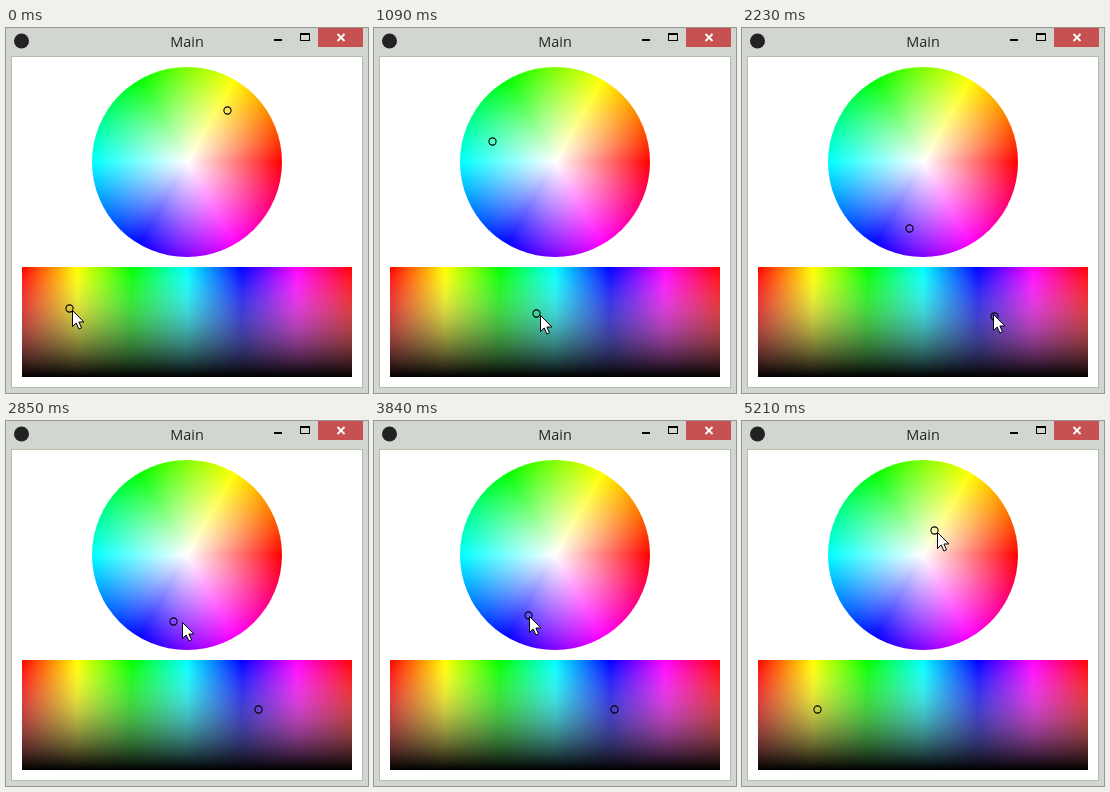
Animation of 362x365 px, one loop 5.44 s. Source, as an HTML page:

```html
<!DOCTYPE html>
<html lang="en">
<head>
<meta charset="utf-8">
<title>Main</title>
<style>
html, body { margin: 0; width: 100%; height: 100%; overflow: hidden; background: #d2d6d0; }
.client, .wheel, svg { position: absolute; box-sizing: border-box; }
.client { left: 5px; top: 28px; width: 352px; height: 332px; background: #fff; border: 1px solid #b3bdab; }
.wheel {
  left: 86px; top: 39px; width: 190px; height: 190px; border-radius: 50%;
  background:
    radial-gradient(circle closest-side, #fff, rgba(255, 255, 255, 0)),
    conic-gradient(from 90deg, #f00, #f0f, #00f, #0ff, #0f0, #ff0, #f00);
}
svg { left: 0; top: 0; }
text { font: 14.4px "Open Sans", "Noto Sans", sans-serif; fill: #262626; }
.ring { fill: none; stroke: #000; stroke-width: 1.1; }
</style>
</head>
<body>
<div class="client"></div>
<div class="wheel"></div>
<svg width="362" height="365" viewBox="0 0 362 365">
  <defs>
    <linearGradient id="hues">
      <stop offset="0" stop-color="#f00"/>
      <stop offset=".16667" stop-color="#ff0"/>
      <stop offset=".33333" stop-color="#0f0"/>
      <stop offset=".5" stop-color="#0ff"/>
      <stop offset=".66667" stop-color="#00f"/>
      <stop offset=".83333" stop-color="#f0f"/>
      <stop offset="1" stop-color="#f00"/>
    </linearGradient>
    <linearGradient id="shade" x2="0" y2="1">
      <stop offset="0" stop-color="#fff" stop-opacity="0"/>
      <stop offset="1" stop-color="#000"/>
    </linearGradient>
  </defs>

  <circle cx="15.5" cy="13" r="7.5" fill="#222"/>
  <text x="181" y="19" text-anchor="middle">Main</text>
  <path d="M268 11h8v2h-8z"/>
  <path d="M294 5h10v8h-10zM295 7v5h8v-5z" fill-rule="evenodd"/>
  <path d="M312 0h45v19h-45z" fill="#c75050"/>
  <path d="M331.5 6l7 7m0-7l-7 7" stroke="#fff" stroke-width="1.8"/>

  <path d="M16 239h330v110h-330z" fill="url(#hues)"/>
  <path d="M16 239h330v110h-330z" fill="url(#shade)"/>

  <circle id="wheelRing" class="ring" r="3.6"/>
  <circle id="barRing" class="ring" r="3.6"/>
  <path id="cursor" d="M.5 .5v16l3.7-3.5 2.7 6 2.6-1.1-2.6-5.9h5z" fill="#fff" stroke="#000"/>
</svg>
<script>
const LOOP = 5440;

// Bursts of movement: first update, last update, number of updates
const bursts = [
  [150, 690, 8], [760, 1240, 7], [1320, 1850, 8],
  [2170, 2690, 8], [2770, 2850, 2], [3070, 3380, 5],
  [3610, 4140, 8], [4220, 4760, 8], [4830, 5210, 6]
];
const ticks = [0];
for (const [start, end, n] of bursts)
  for (let i = 0; i < n; i++)
    ticks.push(Math.floor((start + (end - start) * i / (n - 1) + 4) / 10) * 10);

// Smooth curve through [time, value] points, without overshoot
function track(...p) {
  const slope = i => (p[i + 1][1] - p[i][1]) / (p[i + 1][0] - p[i][0]);
  const tangent = i => {
    if (i === 0 || i === p.length - 1) return 0;
    const a = slope(i - 1), b = slope(i);
    return a * b > 0 ? 2 * a * b / (a + b) : 0;
  };
  return t => {
    if (t <= p[0][0]) return p[0][1];
    const i = p.findIndex((q, k) => k < p.length - 1 && t < p[k + 1][0]);
    if (i < 0) return p[p.length - 1][1];
    const h = p[i + 1][0] - p[i][0], u = (t - p[i][0]) / h, v = 1 - u;
    return p[i][1] * v * v * (1 + 2 * u) + p[i + 1][1] * u * u * (3 - 2 * u)
      + h * u * v * (tangent(i) * v - tangent(i + 1) * u);
  };
}

const hue = track([70, 52.6], [610, 95.6], [690, 103], [1240, 187], [1470, 224.7], [1850, 258.3],
  [3530, 258.3], [3840, 245.8], [4140, 214.5], [4600, 165.4], [4760, 146.3], [5210, 66.1]);
const radius = track([0, 66.5], [3530, 66.5], [3840, 64.7], [4140, 60], [4600, 39.8],
  [4760, 36], [5000, 26.5], [5080, 26.3], [5210, 28.4]);
const barY = track([70, 280], [610, 291], [690, 291], [1240, 281], [1470, 270], [1850, 288]);
const onWheel = track([2090, 0], [2690, 1]);
const offX = track([70, 3], [610, 5], [1470, 3], [2090, 3], [2690, 10], [2850, 9],
  [3000, 9], [3380, 3], [3530, 3], [3840, 1], [4600, 4], [5210, 3]);
const offY = track([2090, 2], [2690, 3], [2850, 1], [3000, 1], [3380, 3], [3530, 3],
  [3840, 1], [4600, 1], [5210, 2]);

const [wheelRing, barRing, cursor] =
  ["wheelRing", "barRing", "cursor"].map(id => document.getElementById(id));

function place(el, x, y, shift) {
  el.setAttribute("transform", `translate(${Math.round(x) + shift} ${Math.round(y) + shift})`);
}

function draw(now) {
  const time = now % LOOP;
  const t = ticks.filter(k => k <= time).pop();
  const angle = hue(t) * Math.PI / 180, r = radius(t);
  const wx = 180.5 + r * Math.cos(angle), wy = 135 - r * Math.sin(angle);
  const bx = 14.8 + hue(t) * 330 / 360, by = barY(t);
  const m = onWheel(t);
  place(wheelRing, wx, wy, 0.5);
  place(barRing, bx, by, 0.5);
  place(cursor, bx + (wx - bx) * m + offX(t), by + (wy - by) * m + offY(t), 0);
}

const begin = performance.now();
function frame() {
  draw(performance.now() - begin);
  requestAnimationFrame(frame);
}
frame();
</script>
</body>
</html>
```
